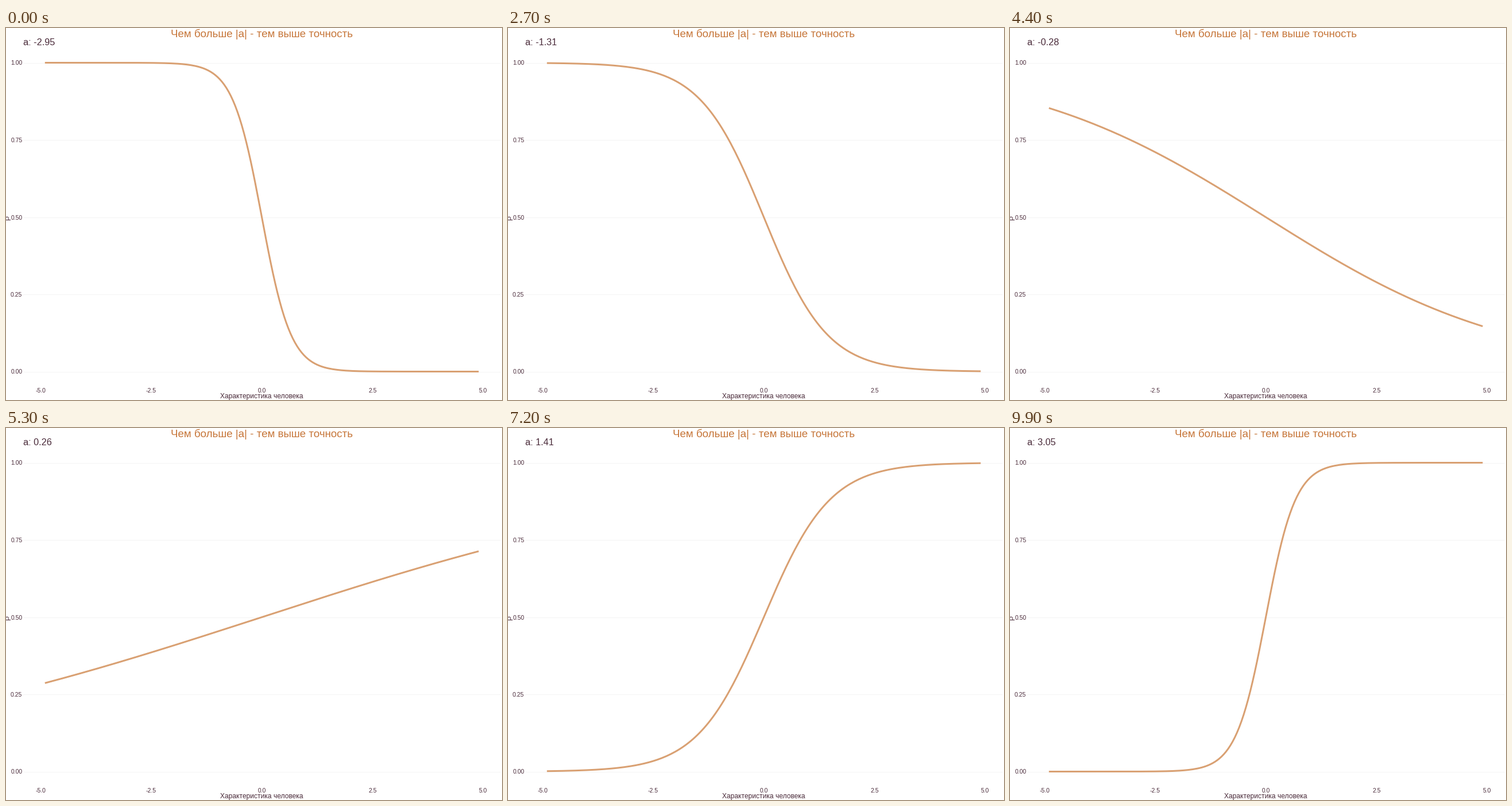
A matplotlib script that plays this animation: 864x648 px, repeating every 10000 ms.

```python
import numpy as np
import matplotlib.pyplot as plt
from matplotlib.animation import FuncAnimation

W, H, DPI = 864, 648, 72
FRAMES, INTERVAL = 100, 100

INK = "#4a2b3a"
TITLE = "#c67538"
CURVE = "#d9a072"
GRID = "#f4f4f4"

# Plot geometry in pixels
X0, X_UNIT = 445.6, 77.1
Y0, Y_UNIT = 598.5, 538.0
LEFT, RIGHT = 30, 861

A_START, A_END = -2.95, 3.05
LAG = 0.076  # the drawn slope trails the label slightly

plt.rcParams["font.family"] = "Liberation Sans"
plt.rcParams["axes.unicode_minus"] = False

fig = plt.figure(figsize=(W / DPI, H / DPI), dpi=DPI, facecolor="white")
ax = fig.add_axes([0, 0, 1, 1])
ax.set_xlim(0, W)
ax.set_ylim(H, 0)
ax.axis("off")


def to_x(v):
    return X0 + v * X_UNIT


def to_y(p):
    return Y0 - p * Y_UNIT


def label(x, y, s, size, color=INK, ha="center", **kw):
    return ax.text(x, y, s, fontsize=size, color=color, ha=ha,
                   va=kw.pop("va", "baseline"), **kw)


for p in np.linspace(0, 1, 5):
    y = to_y(p)
    ax.plot([LEFT, RIGHT], [y, y], color=GRID, lw=1,
            solid_capstyle="butt", zorder=1)
    label(28.3, y + 4, f"{p:.2f}", 10.4, ha="right")

for v in np.linspace(-5, 5, 5):
    label(to_x(v), 635.3, f"{v:.1f}", 10.4)

label(X0, 16, "Чем больше |a| - тем выше точность", 18.8, TITLE)
label(X0, 644.5, "Характеристика человека", 12)
label(5.3, 330, "P", 12, va="center", rotation=90)
slope_text = label(29.5, 30, "", 16.2, ha="left")

theta = np.linspace(-4.9, 4.9, 197)
curve, = ax.plot(to_x(theta), to_y(0.5 + 0 * theta), color=CURVE, lw=3,
                 solid_capstyle="butt", solid_joinstyle="round", zorder=2)


def draw(i):
    a = A_START + (A_END - A_START) * i / (FRAMES - 1)
    curve.set_ydata(to_y(1 / (1 + np.exp(-(a - LAG) * theta))))
    slope_text.set_text(f"a: {round(a, 2):g}")
    return curve, slope_text


anim = FuncAnimation(fig, draw, frames=FRAMES, interval=INTERVAL,
                     repeat=True, repeat_delay=0, blit=False)
plt.show()
```
